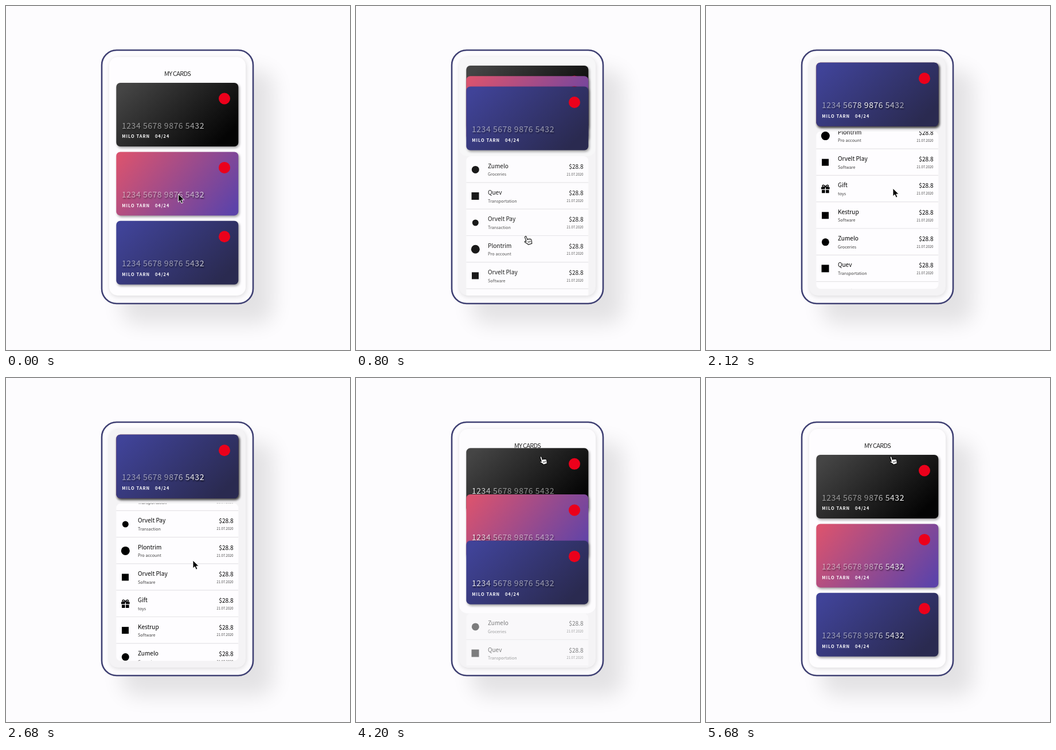
An HTML page for the animation above (5.72 s loop, 600 by 600 pixels).

```html
<!DOCTYPE html>
<html lang="en">
<head>
<meta charset="utf-8">
<title>My cards</title>
<style>
  html, body { margin: 0; width: 100%; height: 100%; overflow: hidden; background: #fdfcfe; }
  svg { display: block; width: 600px; height: 600px; }
  text { font-family: "Noto Sans CJK SC", "Noto Sans CJK JP", "Noto Sans CJK KR", "Noto Sans", sans-serif; white-space: pre; }
  .title { font-size: 11px; font-weight: 300; letter-spacing: -.75px; fill: #222; text-anchor: middle; }
  .number { font-size: 14px; letter-spacing: .54px; fill: url(#shine); filter: drop-shadow(1.5px 2px 1px rgba(0,0,0,.85)); }
  .owner { font-size: 7.4px; font-weight: 700; letter-spacing: 1px; fill: #fff; }
  .shop { font-size: 10.1px; fill: #000; }
  .kind { font-size: 7.3px; fill: #444; }
  .price { font-size: 10.1px; fill: #000; text-anchor: end; }
  .date { font-size: 5.8px; fill: #444; text-anchor: end; }
</style>
</head>
<body>
<svg viewBox="0 0 600 600">
  <defs>
    <linearGradient id="card0" gradientUnits="userSpaceOnUse" x1="225" y1="-12" x2="355" y2="122">
      <stop stop-color="#454545"/><stop offset="1" stop-color="#040404"/>
    </linearGradient>
    <linearGradient id="card1" gradientUnits="userSpaceOnUse" x1="215" y1="-12" x2="380" y2="122">
      <stop stop-color="#d9536f"/><stop offset="1" stop-color="#5d43a9"/>
    </linearGradient>
    <linearGradient id="card2" gradientUnits="userSpaceOnUse" x1="225" y1="-12" x2="355" y2="122">
      <stop stop-color="#404398"/><stop offset="1" stop-color="#2a2a50"/>
    </linearGradient>
    <linearGradient id="shine" gradientUnits="userSpaceOnUse" x1="0" y1="0" x2="120" y2="0">
      <stop stop-color="#fff" stop-opacity=".52"/>
      <stop offset=".5" stop-color="#fff"/>
      <stop offset="1" stop-color="#fff" stop-opacity=".52"/>
    </linearGradient>
    <filter id="farBlur" x="-40%" y="-40%" width="180%" height="180%"><feGaussianBlur stdDeviation="18"/></filter>
    <filter id="panelBlur" x="-20%" y="-20%" width="140%" height="140%"><feGaussianBlur stdDeviation="4"/></filter>
    <filter id="cardBlur" x="-20%" y="-20%" width="140%" height="140%"><feGaussianBlur stdDeviation="2"/></filter>
    <clipPath id="panelClip"><rect x="180" y="89" width="238" height="416" rx="15"/></clipPath>
    <clipPath id="listClip"><rect x="192.3" width="213" height="275" rx="8"/></clipPath>
  </defs>

  <rect width="600" height="600" fill="#fdfcfe"/>
  <rect x="202" y="112" width="264" height="442" rx="26" opacity=".1" filter="url(#farBlur)"/>
  <rect x="167" y="77" width="264" height="442" rx="26" fill="#fdfcfe" stroke="#3f4073" stroke-width="2.6"/>
  <rect x="181" y="91" width="238" height="416" rx="15" opacity=".13" filter="url(#panelBlur)"/>
  <g clip-path="url(#panelClip)">
    <rect x="180" y="89" width="238" height="416" fill="#f4f3f5"/>
    <rect id="header" x="180" y="89" width="238" rx="14" fill="#fefdff"/>
    <g id="list"><g clip-path="url(#listClip)">
      <rect x="192" width="214" height="275" fill="#fefdff"/>
      <g id="rows"></g>
    </g></g>
  </g>
  <text class="title" x="299" y="122">MY CARDS</text>
  <g id="cards"></g>
  <g id="cursor" stroke-linejoin="round">
    <path id="arrow" d="M0 0V14L3.3 11 5.5 16.2 8 15.1 5.8 10.1H10.3Z" fill="#000" stroke="#fff"/>
    <g id="hand" transform="translate(-5.3 1) rotate(-18)" stroke="#000">
      <path fill="#fff" d="M4 1.8a1.4 1.4 0 0 1 2.8 0V7c.6-.9 2.3-.7 2.5.2.7-.6 2-.3 2.2.6.8-.4 1.8.1 1.8 1.1V11c0 2-.9 2.7-.9 4.8H5.6C5.2 13.3 2.6 11.5 1.4 9.9.7 8.8 2 7.8 3 8.6L4 9.6Z"/>
      <path fill="none" stroke-width=".7" d="M6.9 10v3M8.9 10v3M10.9 10v3"/>
    </g>
  </g>
</svg>
<script>
const LOOP = 5720, ROW = 46.3, STACK_TOP = 98.7;
const el = id => document.getElementById(id);
const clamp = x => Math.min(1, Math.max(0, x));
const mix = (a, b, k) => a + (b - a) * k;
const span = (t, from, to) => clamp((t - from) / (to - from));
const smooth = k => (1 - Math.cos(Math.PI * k)) / 2;
const moveY = (node, y) => node.setAttribute('transform', `translate(0 ${y.toFixed(2)})`);

// cubic-bezier(.25, .1, .25, 1)
function ease(x) {
  const bezier = (a, b, u) => 3 * a * u * (1 - u) ** 2 + 3 * b * u * u * (1 - u) + u ** 3;
  let lo = 0, hi = 1;
  for (let i = 0; i < 24; i++) {
    const mid = (lo + hi) / 2;
    if (bezier(.25, .25, mid) < x) lo = mid; else hi = mid;
  }
  return x >= 1 ? 1 : bezier(.1, 1, lo);
}

const dot = r => `<circle cx="208.3" cy="23.5" r="${r}"/>`;
const square = s => `<rect x="${208 - s / 2}" y="${23.3 - s / 2}" width="${s}" height="${s}"/>`;
const gift = `<path d="M201 20h6.6v3.8H201zM209 20h6.6v3.8H209zM202 25h5.6v5.5H202zM209 25h5.6v5.5H209z"/>
  <path d="M208.3 20c-1-3.6-5.4-4.5-5.2-1.6.1 1.2 2 1.6 5.2 1.6 3.2 0 5.1-.4 5.2-1.6.2-2.9-4.2-2-5.2 1.6" fill="none" stroke="#000" stroke-width="1.5"/>`;

const shops = [
  ['Zumelo', 'Groceries', dot(6.5)],
  ['Quev', 'Transportation', square(13)],
  ['Orvelt Pay', 'Transaction', dot(5.5)],
  ['Plontrim', 'Pro account', dot(7.5)],
  ['Orvelt Play', 'Software', square(12)],
  ['Gift', 'toys', gift],
  ['Kestrup', 'Software', square(12)]
];

el('rows').innerHTML = Array.from({ length: 10 }, (_, i) => {
  const [shop, kind, icon] = shops[i % shops.length];
  return `<g transform="translate(0 ${i * ROW})">${icon}
    <text class="shop" x="230" y="20.8">${shop}</text>
    <text class="kind" x="230" y="34.4">${kind}</text>
    <text class="price" x="396.5" y="21.8">$28.8</text>
    <text class="date" x="396.5" y="33.6">21.07.2020</text>
    <path d="M192 46H406" stroke="#e5e4e7" stroke-width="1.2"/></g>`;
}).join('');

el('cards').innerHTML = [0, 1, 2].map(i => `<g>
  <rect x="194" y="2.5" width="213" height="111" rx="7" opacity=".38" filter="url(#cardBlur)"/>
  <rect x="192.3" width="213" height="111" rx="7" fill="url(#card${i})"/>
  <circle cx="381" cy="27.5" r="10" fill="#eb001b"/>
  <text class="number" x="202" y="79.7">1234 5678 9876 5432</text>
  <text class="owner" x="202.3" y="96.4">MILO TARN</text>
  <text class="owner" x="260" y="96.4">04/24</text></g>`).join('');
const cards = [...el('cards').children];

// [start, end, x, y]: tip position reached at the end of each move
const moves = [[0, 330, 295.5, 402], [950, 1450, 326, 318], [3080, 3560, 322, 137]];

function cursorAt(t) {
  let x = 300.5, y = 328;
  for (const [from, to, toX, toY] of moves) {
    const k = smooth(span(t, from, to));
    x = mix(x, toX, k);
    y = mix(y, toY, k);
  }
  return [x, y];
}

function draw(t) {
  const open = ease(span(t, 360, 1160)) - ease(span(t, 3888, 4688));
  cards.forEach((card, i) => moveY(card, mix(134 + i * 120.4, STACK_TOP, open)));

  const listTop = 505 - 286.4 * open;
  el('header').setAttribute('height', listTop - 89);
  el('header').setAttribute('opacity', 1 - open * open);
  moveY(el('list'), listTop);
  el('list').setAttribute('opacity', Math.max(0, open) ** .65);

  const scroll = smooth(span(t, 1700, 2280)) - smooth(span(t, 2370, 2938));
  moveY(el('rows'), -187 * scroll);

  const shineTime = (t + 2100) % 3000 + 900;
  const peak = 75 + .1 * shineTime;
  el('shine').setAttribute('gradientTransform', `translate(${peak - 60} 0)`);

  const [x, y] = cursorAt(t);
  const pointing = (t > 100 && t < 1000) || (t > 3000 && y < 209);
  el('cursor').setAttribute('transform', `translate(${x} ${y})`);
  el('hand').style.display = pointing ? '' : 'none';
  el('arrow').style.display = pointing ? 'none' : '';
}

const start = performance.now();
function tick() {
  draw((performance.now() - start) % LOOP);
  requestAnimationFrame(tick);
}
tick();
</script>
</body>
</html>
```
